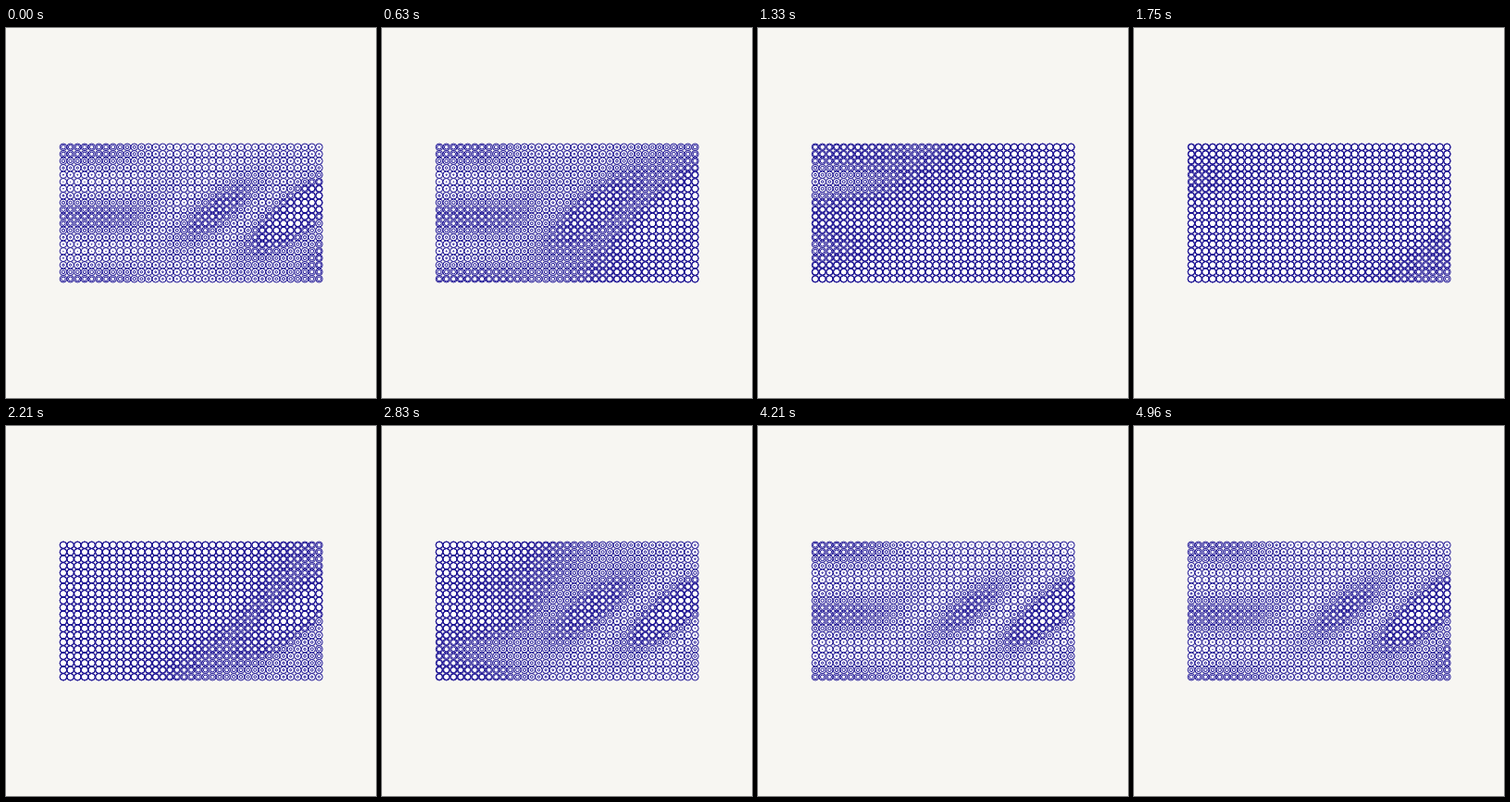
These frames come from a looping animation (400 by 400 pixels, 5 s). An HTML page with a canvas:

```html
<!DOCTYPE html>
<html lang="en">
<head>
<meta charset="utf-8">
<title>Ring field</title>
<style>
  html, body { margin: 0; width: 100%; height: 100%; overflow: hidden; background: #f7f6f2; }
  canvas { display: block; width: 400px; height: 400px; }
</style>
</head>
<body>
<canvas id="stage"></canvas>
<script>
const LOOP = 5000, COLS = 37, ROWS = 20, STEP_X = 7.68, STEP_Y = 7.5;
const OUTER = 3.75, PAPER = '#f7f6f2', INK = '#13098f';
const WAVE = { height: 9, spread: 95, start: 812, speed: 0.237 };

const bell = d => Math.exp(-d * d / 2);
const crest = (d, period) => Math.cos(Math.PI * d / period) ** 2;

function smoothstep(from, to, x) {
  const k = Math.min(1, Math.max(0, (x - from) / (to - from)));
  return k * k * (3 - 2 * k);
}

// Level bands on the left turn into slanted ridges that grow to the right
function restLevel(x, y) {
  const bands = 2.4 * crest(y - 204, 73);
  const ridges = 3 * (x / 222) ** 2 * crest(x + y - 422, 91) * bell((y - 204) / 27);
  const mix = smoothstep(100, 190, x);
  return 0.15 + bands * (1 - mix) + ridges * mix;
}

// Diagonal swell travelling from the lower right to the upper left
function waveLevel(diag, t) {
  let sum = 0;
  for (const shift of [-LOOP, 0, LOOP]) {
    const d = diag - WAVE.start + WAVE.speed * (t + shift);
    sum += 1 / Math.cosh(d / WAVE.spread);
  }
  return WAVE.height * sum;
}

const cells = [];
for (let j = 0; j < ROWS; j++) {
  for (let i = 0; i < COLS; i++) {
    const x = 200.2 + (i - (COLS - 1) / 2) * STEP_X;
    const y = 200 + (j - (ROWS - 1) / 2) * STEP_Y;
    cells.push({ x, y, rest: restLevel(x, y) });
  }
}

const canvas = document.getElementById('stage');
const ratio = window.devicePixelRatio || 1;
canvas.width = canvas.height = 400 * ratio;
const ctx = canvas.getContext('2d');
ctx.scale(ratio, ratio);

function ring(x, y, r) {
  ctx.beginPath();
  ctx.arc(x, y, r, 0, Math.PI * 2);
}

function draw(t) {
  ctx.fillStyle = PAPER;
  ctx.fillRect(0, 0, 400, 400);
  ctx.fillStyle = '#fff';
  ctx.strokeStyle = INK;
  ctx.lineWidth = 1;
  for (const { x, y, rest } of cells) {
    ring(x, y, OUTER);
    ctx.fill();
    ctx.stroke();
    // Inner radius levels off as it nears the outer ring
    ring(x, y, OUTER * Math.tanh((rest + waveLevel(x + y, t)) / OUTER));
    ctx.stroke();
  }
}

const origin = performance.now();
function tick() {
  draw((performance.now() - origin) % LOOP);
  requestAnimationFrame(tick);
}
tick();
</script>
</body>
</html>
```
